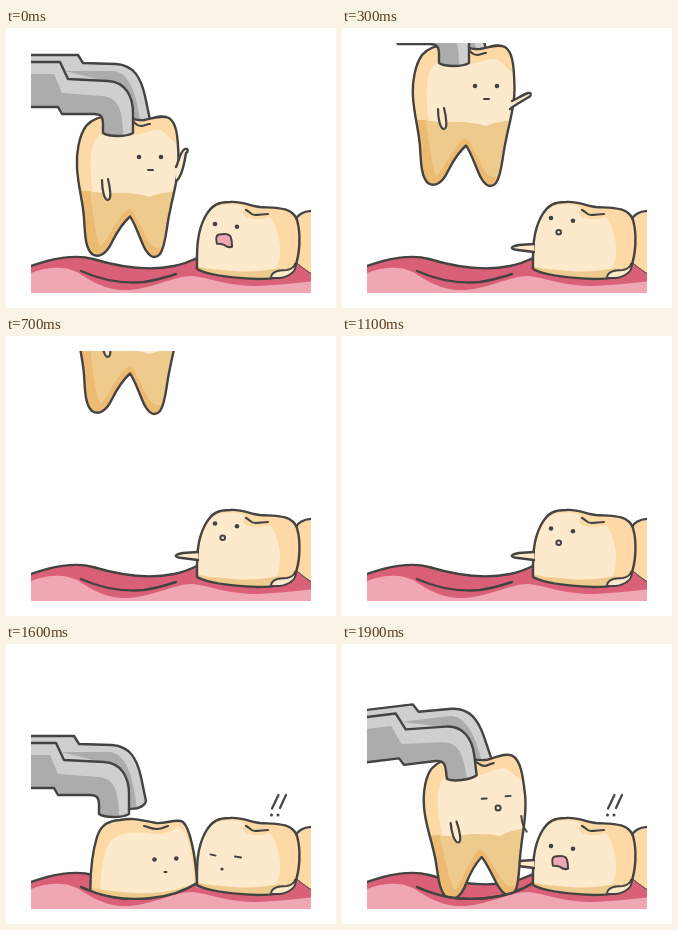
Write an HTML page with a canvas that moves like this. It is 330 px wide and 280 px high and loops after 2 s.

```html
<!DOCTYPE html>
<html lang="en">
<head>
<meta charset="utf-8">
<title>Tooth extraction</title>
<style>
html, body { margin: 0; width: 100%; height: 100%; overflow: hidden; background: #fff; }
canvas { display: block; width: 330px; height: 280px; }
</style>
</head>
<body>
<canvas id="stage" width="330" height="280"></canvas>
<script>
const ctx = document.getElementById('stage').getContext('2d');
const LOOP = 2000, STEP = 100;
const INK = '#454341', CREAM = '#fdeacd', PEACH = '#fdd9a5', TAN = '#eeca8c', AMBER = '#edba72';
const PINK = '#f0a7b4', ROSE = '#da6078', LIGHT = '#cfcfcf', GREY = '#acacac';
const P = d => new Path2D(d);

const gum = {
  top: 'M20 240C45 230 70 226 87 231C110 238 138 244 168 238C178 236 185 233 193 229',
  light: P('M20 247C38 239 56 237 71 244C85 253 98 261 115 262C145 263 165 248 187 248C203 250 220 257 245 258C268 258 288 255 310 253V280H20Z'),
  line: P('M75 243C95 252 115 256 138 254C151 252 161 249 170 246'),
  seat: 'M75 243C95 252 115 257 145 254C165 252 180 246 191 239'
};
const gumFill = P(gum.top + 'L289 235C295 237 300 245 310 248V280H20Z');
const gumTop = P(gum.top), seatLine = P(gum.seat);
const aboveSeat = P(gum.seat + 'H340V-200H-20V243Z');

const third = P('M310 183C298 182 289 187 289 196V235C295 238 300 246 310 248Z');
const side = {
  body: P('M191 241C191 225 190 206 199 189C206 176 213 174 224 174C236 173 244 178 254 179C268 180 286 178 291 192C295 206 294 226 289 239C284 250 266 251 251 251C228 250 203 248 191 241Z'),
  cream: P('M188 238C188 205 195 190 202 183C211 176 230 174 239 180C230 190 252 194 264 189C275 204 277 227 270 242C250 246 215 243 188 238Z'),
  base: P('M190 238C202 243 215 241 224 243C245 245 262 242 274 240L268 254H190Z'),
  foot: P('M265 250C265 243 273 242 281 242C286 241 288 239 289 236C292 243 282 249 274 250Z'),
  crease: P('M240 182C243 183 245 187 249 187C254 187 257 186 262 186'),
  arm: P('M192 216L177 217C167 219 168 221 176 222L192 224'),
  mouth: P('M-7 3C-8 -1 -8 -5 -6 -6C-1 -7 4 -7 6 -5C8 -2 8 3 8 6C4 7 2 6 0 4C-2 3 -4 3 -7 3Z')
};

// Whole tooth, placed as it hangs at time zero
const tooth = {
  body: P('M80 98C73 108 70 125 71 140C72 158 77 174 78 190C79 205 79 220 86 226C93 231 101 225 106 214C111 204 119 193 124 188.5C128 193 133 208 138 219C143 229 149 232 154 226C160 218 160 200 164 183C167 166 173 150 172.5 130C172 110 171 95 163 90C155 86 146 91 138 92C128 93 120 88 110 88C95 87 86 91 80 98Z'),
  cream: P('M88 170C83 145 83 118 91 109C98 103 111 108 124 107C137 107 145 101 154 102C162 105 165 115 180 122V170Z'),
  root: P('M65 162L100 165C120 164 135 166 144 169C150 167 155 164 180 163V235H65Z'),
  shade: P('M72 163H84C87 185 89 207 94 219C99 215 103 207 106 202C112 193 118 182 124 181C130 186 137 204 143 214C148 221 153 222 160 217L156 234H75Z'),
  crease: P('M126 93C130 95 130 98 135 98C139 98 140 96 144 96'),
  arm: P('M96 152C96 161 98 172 102 172C106 172 104 159 102 151')
};

// Crown seated in the gum
const crown = {
  body: P('M89 300C83 265 82 222 91 193C95 180 103 177 114 176C128 173 137 177 150 179C160 180 171 174 177 178C184 184 190 213 191 240V300Z'),
  cream: P('M96 300C92 262 93 222 102 201C109 189 124 187 139 189C151 191 163 191 172 182C185 190 189 215 190 300Z'),
  base: P('M80 243C100 246 120 250 140 249C165 249 180 243 194 237V300H80Z'),
  crease: P('M138 182C143 183 145 185 151 185C157 185 158 183 162 182')
};

const clamp = {
  back: P('M-30 92H68L73 100L106 101C124 102 131 115 135 133L140 157C138 164 130 165 121 165L110 130H-30Z'),
  backShade: P('M55 108L104 108C120 110 127 131 131 165H115L95 118Z'),
  front: P('M-30 99H50L58 116L98 118C116 119 123 134 123 150V170C116 174 99 174 93 170V161C93 154 91 151 84 151H52L48 144H-30Z'),
  shade: P('M-30 111H44L52 130L92 133C108 134 113 146 113 174C104 175 98 174 93 170V161C93 154 91 151 84 151H52L48 144H-30Z')
};

function fill(path, color) { ctx.fillStyle = color; ctx.fill(path); }

function line(path, width = 2.4) {
  ctx.strokeStyle = INK;
  ctx.lineWidth = width;
  ctx.stroke(path);
}

function scoped(draw) { ctx.save(); draw(); ctx.restore(); }

function dot(x, y, r = 2.3) {
  ctx.fillStyle = INK;
  ctx.beginPath();
  ctx.arc(x, y, r, 0, 7);
  ctx.fill();
}

function dash(x, y, w, tilt = 0) {
  line(P(`M${x - w / 2} ${y - tilt}L${x + w / 2} ${y + tilt}`), 2);
}

function ring(x, y, r) {
  ctx.beginPath();
  ctx.arc(x, y, r, 0, 7);
  ctx.strokeStyle = INK;
  ctx.lineWidth = 2;
  ctx.stroke();
}

// Linear value between [step, value] keys
function at(s, keys) {
  let i = 1;
  while (i < keys.length - 1 && s > keys[i][0]) i++;
  const [a, u] = keys[i - 1], [b, v] = keys[i];
  const k = Math.max(0, Math.min(1, (s - a) / (b - a)));
  return u + (v - u) * k;
}

function drawGum(seated) {
  fill(third, PEACH);
  line(third);
  fill(gumFill, ROSE);
  fill(gum.light, PINK);
  line(gumTop);
  line(seated ? seatLine : gum.line);
}

function drawSide(s) {
  fill(side.body, PEACH);
  scoped(() => {
    ctx.clip(side.body);
    fill(side.cream, CREAM);
    fill(side.base, TAN);
  });
  line(side.body);
  fill(side.foot, CREAM);
  line(side.foot, 2);
  line(side.crease, 2.2);
  if ((s > 0 && s < 12) || s > 16) {
    fill(side.arm, CREAM);
    line(side.arm);
  }
  const y = at(s, [[0, 196], [3, 190], [7, 187.5], [11, 192.5], [13, 205], [16, 211], [19, 202]]);
  if (s === 16) {
    dash(207, y, 5, 0.6);
    dash(232, y + 2, 6, 0.4);
    dot(216, y + 14, 1.6);
  } else {
    dot(209, y);
    dot(231, y + 2.8);
    drawSideMouth(s, y + 14.3);
  }
  if (s >= 16) {
    line(P('M272.5 151L266 164.5M280 151L274 164'), 2.2);
    dot(265.5, 171, 1.5);
    dot(272, 171, 1.5);
  }
}

function drawSideMouth(s, y) {
  if (s < 2 || s > 16) {
    scoped(() => {
      ctx.translate(218, y + 2.5);
      fill(side.mouth, PINK);
      line(side.mouth, 2);
    });
  } else if (s < 13) {
    ring(216.7, y, 2.3);
  } else {
    line(P(`M213 ${y - 3}Q216.5 ${y + 2} 221 ${y - 3}`), 2);
  }
}

function drawWave(s) {
  if (s > 16) {
    line(P('M167 151C167 158 169 164 171 167'), 2);
    return;
  }
  const k = Math.min(1, s / 2);
  const mix = (a, b) => a + (b - a) * k;
  const x = mix(180, 187), y = mix(121, 136);
  const arm = P(`M170 ${mix(139, 144)}C${mix(173, 175)} ${mix(133, 142)} ${mix(174, 180)} ${mix(123, 138)} ${x - 1} ${y}`
    + `C${x + 3} ${y - 1} ${x + 2} ${y + 3} ${x} ${y + 4}C${mix(178, 180)} ${mix(138, 144)} ${mix(175, 173)} ${mix(150, 148)} ${mix(170, 168)} ${mix(153, 152)}`);
  fill(arm, CREAM);
  line(arm);
}

function drawTooth(s) {
  const lift = s > 16;
  const dx = lift ? at(s, [[18, 12], [19, 9]]) : 0;
  const dy = lift ? at(s, [[18, 51], [19, 25]]) : at(s, [[0, 0], [3, -71], [7, -151], [11, -231]]);
  ctx.translate(122 + dx, 110 + dy);
  if (lift) ctx.rotate(-0.085);
  ctx.translate(-122, -110);
  fill(tooth.body, PEACH);
  scoped(() => {
    ctx.clip(tooth.body);
    fill(tooth.cream, CREAM);
    fill(tooth.root, TAN);
    fill(tooth.shade, AMBER);
  });
  line(tooth.body);
  line(tooth.crease, 2.2);
  fill(tooth.arm, CREAM);
  line(tooth.arm, 2.2);
  drawWave(s);
  if (lift) {
    dash(131.5, 130.5, 5);
    dash(155.5, 130, 5);
    ring(144.5, 141, 2.5);
  } else {
    dot(133, 129);
    dot(155, 129);
    dash(144.5, 142, 5);
  }
}

function drawCrown(s) {
  ctx.translate(0, at(s, [[12, 44], [13, 20], [14, 0], [16, 0], [17, -8]]));
  fill(crown.body, PEACH);
  scoped(() => {
    ctx.clip(crown.body);
    fill(crown.cream, CREAM);
    if (s > 13) fill(crown.base, TAN);
  });
  line(crown.body);
  line(crown.crease, 2.2);
  if (s === 17) {
    dash(148, 215, 5);
    dash(170, 214, 5);
  } else {
    dot(148.5, 215.5);
    dot(170.3, 214.5);
  }
  dash(159.5, 228, s < 16 ? 3 : 2);
}

function placeClamp(s) {
  const late = s >= 16;
  const dx = late ? at(s, [[16, 0], [17, 4], [18, 13], [19, 12]]) : 4;
  const dy = late ? at(s, [[16, 0], [17, 15], [18, -11], [19, -37]]) : at(s, [[0, -65], [3, -135], [7, -216]]);
  const turn = late ? at(s, [[16, 0], [17, -0.03], [19, -0.12]]) : 0;
  ctx.translate(108 + dx, 172 + dy);
  ctx.rotate(turn);
  ctx.translate(-108, -172);
}

function drawClamp(s, front) {
  if (s > 6 && s < 16) return;
  const shape = front ? clamp.front : clamp.back;
  scoped(() => {
    placeClamp(s);
    fill(shape, LIGHT);
    scoped(() => {
      ctx.clip(shape);
      fill(front ? clamp.shade : clamp.backShade, GREY);
    });
    line(shape);
  });
}

function draw(s) {
  ctx.fillStyle = '#fff';
  ctx.fillRect(0, 0, 330, 280);
  scoped(() => {
    ctx.beginPath();
    ctx.rect(25, 15, 280, 250);
    ctx.clip();
    ctx.lineCap = ctx.lineJoin = 'round';
    drawGum(s >= 12);
    drawSide(s);
    drawClamp(s, false);
    scoped(() => {
      if (s >= 12) ctx.clip(aboveSeat);
      if (s >= 12 && s < 18) drawCrown(s);
      else drawTooth(s);
    });
    if (s >= 12) line(seatLine);
    drawClamp(s, true);
  });
}

function tick() {
  draw(Math.floor(performance.now() % LOOP / STEP));
  requestAnimationFrame(tick);
}
tick();
</script>
</body>
</html>
```
